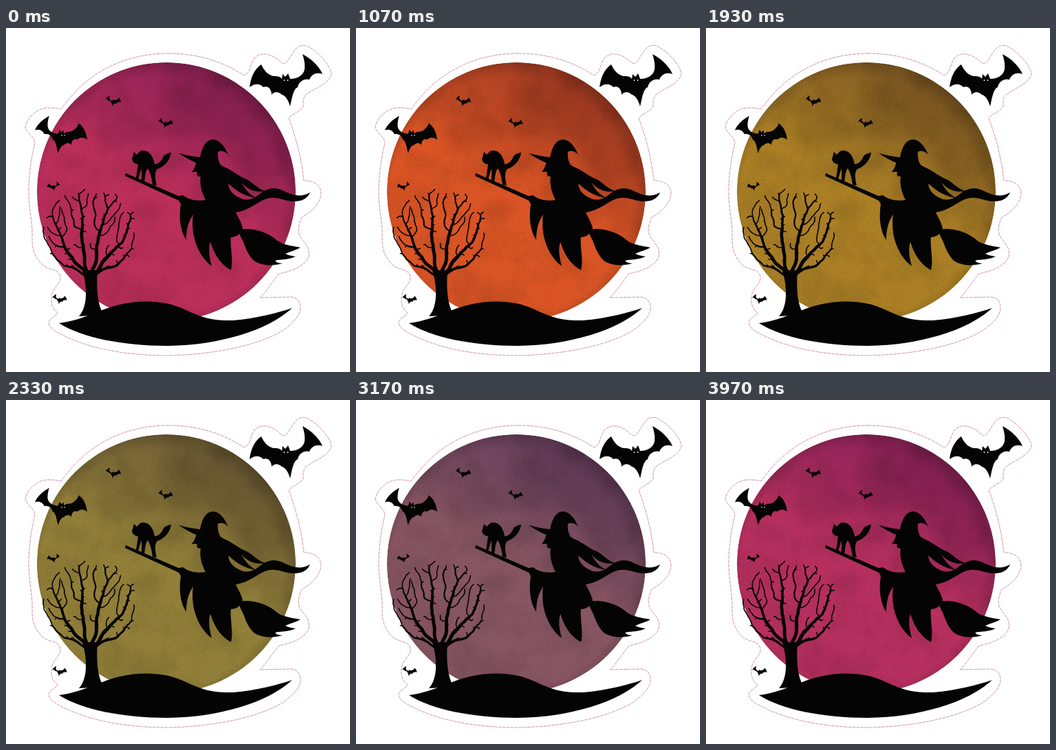
Recreate the animation shown at these times as an HTML page. Size 500 by 500 pixels, loop 4010 ms.

```html
<!DOCTYPE html>
<html lang="en">
<head>
<meta charset="utf-8">
<title>Witch moon</title>
<style>
  html, body { margin: 0; width: 100%; height: 100%; overflow: hidden; background: #fff; }
  svg { position: absolute; left: 0; top: 0; width: 500px; height: 500px; }
</style>
</head>
<body>
<svg viewBox="0 0 500 500">
  <defs>
    <linearGradient id="sky" gradientUnits="userSpaceOnUse" x1="335" y1="75" x2="215" y2="290">
      <stop class="hi" offset=".1"/>
      <stop class="lo" offset=".8"/>
    </linearGradient>
    <radialGradient id="rim" gradientUnits="userSpaceOnUse" cx="226" cy="245" r="198">
      <stop offset=".88" stop-opacity="0"/>
      <stop offset="1" stop-opacity=".18"/>
    </radialGradient>
    <clipPath id="disc"><circle cx="233" cy="238" r="188"/></clipPath>
    <filter id="blur" x="-30%" y="-30%" width="160%" height="160%"><feGaussianBlur stdDeviation="7"/></filter>
    <filter id="clouds" x="0" y="0" width="1" height="1" color-interpolation-filters="sRGB">
      <feTurbulence type="fractalNoise" baseFrequency=".022" numOctaves="4" seed="5"/>
      <feColorMatrix values="0 0 0 0 0  0 0 0 0 0  0 0 0 0 0  2.4 0 0 0 -.9"/>
    </filter>
    <filter id="grain" x="0" y="0" width="1" height="1" color-interpolation-filters="sRGB">
      <feTurbulence type="fractalNoise" baseFrequency=".7" numOctaves="2" seed="8"/>
      <feColorMatrix values="0 0 0 0 0  0 0 0 0 0  0 0 0 0 0  2.4 0 0 0 -.9"/>
    </filter>
    <!-- centred on the head -->
    <path id="bat" d="M-36-23C-32-14-25-6-16-6C-11-6-8-5-6-2L-5-9L-1-5L3-10L6-2C15-2 25-6 27-16C28-24 26-31 24-38C37-31 48-21 53-9C45-12 37-9 34-1C27-3 19 1 17 10C11 12 9 24 6 38C3 28-1 22-6 21C-11 16-17 16-21 21C-21 12-27 7-33 10C-39 4-46 5-53 10C-51-5-46-16-36-23Z"/>
  </defs>

  <!-- sticker edge -->
  <path fill="#fff" stroke="#b8506f" stroke-width=".6" stroke-dasharray="5 1" d="M236 37C196 37 160 48 130 68C108 83 94 99 80 118C72 116 62 115 53 117C41 121 30 132 28 144C30 153 41 157 42 167C37 188 33 212 33 240C34 270 39 285 38 305C38 320 40 332 54 345C62 352 78 350 79 362C80 371 70 376 67 386C64 399 67 408 75 414C75 418 64 420 62 428C63 438 76 443 90 450C130 468 180 476 235 476C300 475 365 462 402 440C416 430 429 418 428 405C427 395 421 391 412 391L369 392C378 384 386 370 397 357C412 354 434 348 440 332C443 318 432 311 427 302C423 293 426 284 430 275C443 268 458 256 458 238C456 226 443 221 433 222C430 195 424 166 411 131C414 126 430 120 432 114C432 108 431 102 437 96C452 86 471 80 473 66C470 52 452 33 437 26C422 22 418 36 410 47C403 58 399 47 391 43C383 38 370 34 361 44C354 54 356 65 346 69C314 48 278 37 236 37Z"/>

  <g clip-path="url(#disc)">
    <circle cx="233" cy="238" r="188" fill="url(#sky)"/>
    <g filter="url(#blur)" opacity=".08">
      <ellipse cx="310" cy="118" rx="95" ry="48"/>
      <ellipse cx="172" cy="150" rx="40" ry="22"/>
      <ellipse cx="375" cy="195" rx="36" ry="55"/>
    </g>
    <rect x="45" y="50" width="376" height="376" filter="url(#clouds)" opacity=".09"/>
    <rect x="45" y="50" width="376" height="376" filter="url(#grain)" opacity=".12"/>
    <circle cx="233" cy="238" r="188" fill="url(#rim)"/>
  </g>

  <g fill="#050404">
    <!-- hill and trunk -->
    <path d="M77 429C115 424 135 409 165 402C200 394 232 397 255 407C285 421 300 426 330 425C365 422 395 414 416 407C380 440 310 461 235 462C170 462 110 450 77 429Z"/>
    <path d="M106 419C118 406 119 380 111 352L133 352C131 380 133 402 142 417Z"/>
    <g id="tree" fill="none" stroke="#050404" stroke-linecap="round"></g>

    <!-- cat -->
    <path d="M183 191L186 180L190 184L195 179C205 175 214 184 216 198C222 198 227 192 229 186C232 183 236 182 240 181C239 190 232 201 220 205C215 210 217 220 219 229L213 228C212 219 210 210 206 204C202 209 202 218 201 226L196 225C198 215 197 208 197 204C194 211 193 218 191 223L188 222C190 214 191 205 192 198C188 198 184 195 183 191Z"/>

    <!-- broom -->
    <path d="M174 211L262 249L342 290L340 296L258 254L173 215Z"/>
    <path d="M339 293C360 289 384 299 394 309C405 316 418 317 428 319C421 323 413 325 406 328C411 331 416 331 421 332C412 337 400 336 391 338C393 341 397 342 402 342C386 347 370 345 360 338C353 331 349 322 346 314C343 305 338 301 339 293Z"/>

    <!-- witch -->
    <path d="M251 182C262 185 274 187 282 188C285 172 291 162 301 162C312 163 318 173 323 184C317 178 312 178 308 180C307 187 309 194 312 199C317 202 319 204 322 208C300 206 272 197 251 182Z"/>
    <path d="M279 192C274 199 276 203 270 209C274 210 277 208 278 210C276 214 279 216 283 216C281 226 284 238 290 250C278 252 266 250 257 243L248 245L254 256C251 275 253 295 262 308C262 293 265 282 272 271C268 298 277 329 299 346C295 332 294 320 297 311C304 332 312 343 327 352C331 336 325 318 327 304C334 304 341 300 344 291C342 282 337 275 334 268C348 266 360 258 370 252C384 244 394 247 405 250C420 254 436 253 442 239C428 247 416 243 402 236C388 230 378 234 368 242C358 250 348 252 338 246C330 242 324 236 323 226C336 238 350 246 365 247C356 244 348 236 342 224C350 234 362 240 377 237C366 234 358 224 350 220C338 216 330 206 312 200Z"/>
  </g>
  <g id="bats" fill="#050404"></g>
  <g fill="#fff">
    <circle cx="404.5" cy="76" r=".9"/><circle cx="409.5" cy="76" r=".9"/>
    <circle cx="81" cy="156" r=".8"/><circle cx="85" cy="156" r=".8"/>
  </g>
</svg>

<script>
  // Bats share one shape: x, y, size; a negative size faces the other way.
  const bats = [[407, 76, 1], [80, 155, -.717], [156, 106, -.21], [232, 138, -.2], [69, 230, .175], [78, 394, -.2]];
  document.getElementById("bats").innerHTML = bats.map(([x, y, s]) =>
    `<use href="#bat" transform="translate(${x} ${y}) scale(${s} ${Math.abs(s)})"/>`).join("");

  // Tree: a short fan of limbs, then twigs that grow towards scattered buds.
  let seed = 11;
  const rand = () => (seed = (seed * 16807) % 2147483647) / 2147483647;
  const dist = (a, b) => Math.hypot(a.x - b.x, a.y - b.y);
  const STEP = 3, REACH = 34, KILL = 5;

  function scatterBuds(count) {
    const buds = [];
    while (buds.length < count) {
      const a = rand() * 2 * Math.PI, r = Math.pow(rand(), .42);
      const x = 123 + 72 * r * Math.cos(a), y = 297 + 66 * r * Math.sin(a);
      if (y < 354 - Math.abs(x - 122) * .3 && !(y > 330 && Math.abs(x - 122) < 22)) buds.push({ x, y });
    }
    return buds;
  }

  function growTree() {
    const nodes = [];
    const add = (x, y, parent) => nodes.push({ x, y, parent, area: 0 }) - 1;

    for (let limb = 0; limb < 6; limb++) {
      const lean = -1.15 + .46 * limb;
      let last = add(122 + lean * 5, 360, -1);
      for (let i = 0; i < 12; i++) {
        const p = nodes[last], turn = lean + .25 * Math.sin(i * .5 + limb * 2);
        last = add(p.x + STEP * Math.sin(turn), p.y - STEP * Math.cos(turn), last);
      }
    }

    let buds = scatterBuds(340);
    for (let round = 0; round < 60 && buds.length; round++) {
      const pulls = new Map();
      for (const bud of buds) {
        let best = 0, near = Infinity;
        nodes.forEach((n, i) => {
          const d = dist(n, bud);
          if (d < near) { near = d; best = i; }
        });
        if (near > REACH) continue;
        const p = pulls.get(best) || { x: 0, y: 0 };
        p.x += (bud.x - nodes[best].x) / near;
        p.y += (bud.y - nodes[best].y) / near;
        pulls.set(best, p);
      }
      for (const [i, p] of pulls) {
        const n = nodes[i], from = nodes[n.parent] || n;
        const len = Math.hypot(p.x, p.y) || 1;
        // Keep some of the branch's heading so that forks stay narrow.
        const turn = Math.atan2(p.y / len + .45 * (n.y - from.y) / STEP, p.x / len + .45 * (n.x - from.x) / STEP)
          + (rand() - .5) * .5;
        const tip = { x: n.x + STEP * Math.cos(turn), y: n.y + STEP * Math.sin(turn) };
        if (nodes.every(m => dist(m, tip) > 1.6)) add(tip.x, tip.y, i);
      }
      buds = buds.filter(b => nodes.every(n => dist(n, b) > KILL));
    }

    // Branch width follows the number of twigs it carries.
    const groups = {};
    for (let i = nodes.length - 1; i >= 0; i--) {
      const n = nodes[i], parent = nodes[n.parent];
      if (!n.area) n.area = 2.6;
      if (!parent) continue;
      parent.area += n.area;
      const width = Math.min(9, Math.pow(n.area, .47)).toFixed(1);
      groups[width] = (groups[width] || "") +
        `M${parent.x.toFixed(1)} ${parent.y.toFixed(1)}L${n.x.toFixed(1)} ${n.y.toFixed(1)}`;
    }
    document.getElementById("tree").innerHTML = Object.entries(groups)
      .map(([w, d]) => `<path stroke-width="${w}" d="${d}"/>`).join("");
  }
  growTree();

  // Each colour channel swings once per loop: mean, swing, peak angle, shade of the dark side.
  const LOOP = 4010, STEPS = 120;
  const channels = [[182, 47, 75, .78], [91, 43, 190, .74], [69, 38, 313, .95]];
  const hi = document.querySelector(".hi"), lo = document.querySelector(".lo");
  const rgb = list => `rgb(${list.map(Math.round)})`;
  let shown = -1;

  function draw(now) {
    const k = Math.floor(now % LOOP / LOOP * STEPS);
    if (k === shown) return;
    shown = k;
    const light = channels.map(([mean, swing, peak]) =>
      mean + swing * Math.cos(2 * Math.PI * (k / STEPS - peak / 360)));
    lo.setAttribute("stop-color", rgb(light));
    hi.setAttribute("stop-color", rgb(light.map((v, i) => v * channels[i][3])));
  }

  const start = performance.now();
  function tick() {
    draw(performance.now() - start);
    requestAnimationFrame(tick);
  }
  tick();
</script>
</body>
</html>
```
